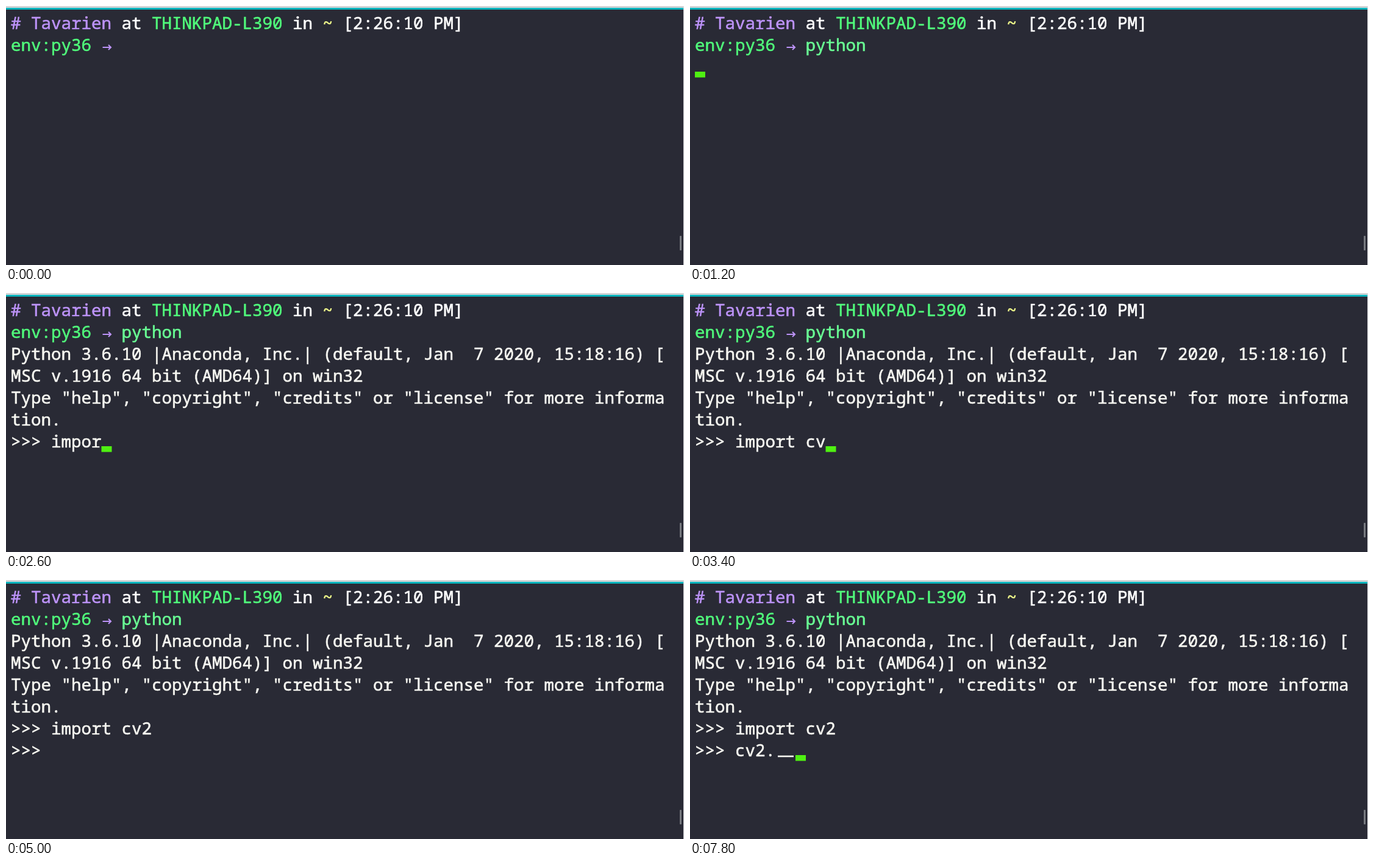
Write an HTML page that moves like this. It is 1112 by 426 pixels and loops after 8 s.

```html
<!DOCTYPE html>
<html lang="en">
<head>
<meta charset="utf-8">
<title>Terminal session</title>
<style>
  html, body { margin: 0; width: 100%; height: 100%; overflow: hidden; background: #292a35; }
  svg { display: block; width: 1112px; height: 426px; color: #f8f8f2; }
  text {
    font: 27.5px "Noto Sans Mono", "DejaVu Sans Mono", monospace;
    font-variant-ligatures: none;
    white-space: pre;
  }
  text, tspan { fill: currentColor; stroke: currentColor; stroke-width: 0.6px; }
  .purple { color: #bd93f9; }
  .green { color: #50fa7b; }
  .yellow { color: #f1fa8c; }
  .white { color: #fff; }
  .command { color: #69ff94; }
</style>
</head>
<body>
<svg viewBox="0 0 1112 426">
  <rect width="1112" height="426" fill="#292a35"/>
  <rect width="1112" height="3" fill="#d3d6d8"/>
  <rect y="3" width="1112" height="3" fill="#08b4bd"/>
  <rect x="1111" width="1" height="426" fill="#e4e4e6"/>
  <rect x="1105" y="378" width="3" height="24" rx="1" fill="#777a80"/>
  <text x="8" y="38"><tspan class="purple"># Tavarien</tspan><tspan class="white"> at </tspan><tspan class="green">THINKPAD-L390</tspan><tspan class="white"> in </tspan><tspan class="yellow">~</tspan><tspan class="white"> [2:26:10 PM]</tspan></text>
  <text x="8" y="74" class="green">env:py36</text>
  <path d="M158.5 68H172M168 64L172 68L168 72" fill="none" stroke="#bd93f9" stroke-width="2.1"/>
  <g id="session"></g>
  <path id="underscore" fill="none" stroke="#f8f8f2" stroke-width="2.6"/>
  <rect id="cursor" width="17" height="9.5" fill="#4ff012"/>
</svg>
<script>
const LOOP = 8000, LEFT = 8, CELL = 16.5, LINE = 36, MAX_ROWS = 7;
const INDENT = " ".repeat(11);
const BANNER = `${INDENT}python
Python 3.6.10 |Anaconda, Inc.| (default, Jan  7 2020, 15:18:16) [
MSC v.1916 64 bit (AMD64)] on win32
Type "help", "copyright", "credits" or "license" for more informa
tion.
>>> `;
const IMPORTED = BANNER + "import cv2\n";
const PROMPT = IMPORTED + ">>> ";

// Start time, terminal contents, cursor lit
const steps = [
  [0, INDENT, false],
  [200, INDENT + "p", true],
  [400, INDENT + "py", true],
  [600, INDENT + "pyth", true],
  [800, INDENT + "pytho", true],
  [1000, INDENT + "python", true],
  [1200, INDENT + "python\n", true],
  [1400, BANNER, true],
  [1600, BANNER + "i", true],
  [1800, BANNER + "im", true],
  [2200, BANNER + "im", false],
  [2600, BANNER + "impor", true],
  [2800, BANNER + "import", true],
  [3000, BANNER + "import ", true],
  [3200, BANNER + "import c", true],
  [3400, BANNER + "import cv", true],
  [3600, BANNER + "import cv2", true],
  [4000, IMPORTED, true],
  [4600, IMPORTED, false],
  [5000, PROMPT, false],
  [5200, PROMPT, true],
  [5600, PROMPT, false],
  [6200, PROMPT + "c", true],
  [6600, PROMPT + "cv", true],
  [6800, PROMPT + "cv2", true],
  [7200, PROMPT + "cv2.", true],
  [7600, PROMPT + "cv2._", true],
  [7800, PROMPT + "cv2.__", true]
];

const byId = id => document.getElementById(id);
const cursor = byId("cursor"), underscore = byId("underscore");
const columnX = column => LEFT + column * CELL;
const baseline = row => 38 + row * LINE;

const rows = Array.from({ length: MAX_ROWS }, (_, i) => {
  const row = document.createElementNS("http://www.w3.org/2000/svg", "text");
  row.setAttribute("x", LEFT);
  row.setAttribute("y", baseline(i + 1));
  if (i === 0) row.setAttribute("class", "command");
  byId("session").append(row);
  return row;
});

function show([, content, lit]) {
  const lines = content.split("\n");
  rows.forEach((row, i) => {
    row.textContent = (lines[i] || "").replace(/_/g, " ");
  });

  const last = lines.at(-1), row = lines.length;
  cursor.setAttribute("x", columnX(last.length));
  cursor.setAttribute("y", (row + 1) * LINE);
  cursor.setAttribute("visibility", lit ? "visible" : "hidden");

  // Adjacent underscores join into one short bar
  const first = last.indexOf("_");
  underscore.setAttribute("d", first < 0 ? "" :
    `M${columnX(first) + 4} ${baseline(row)}H${columnX(last.length) - 3}`);
}

let current;
function tick() {
  const time = performance.now() % LOOP;
  const step = steps.findLast(([start]) => start <= time);
  if (step !== current) show(current = step);
  requestAnimationFrame(tick);
}
tick();
</script>
</body>
</html>
```
